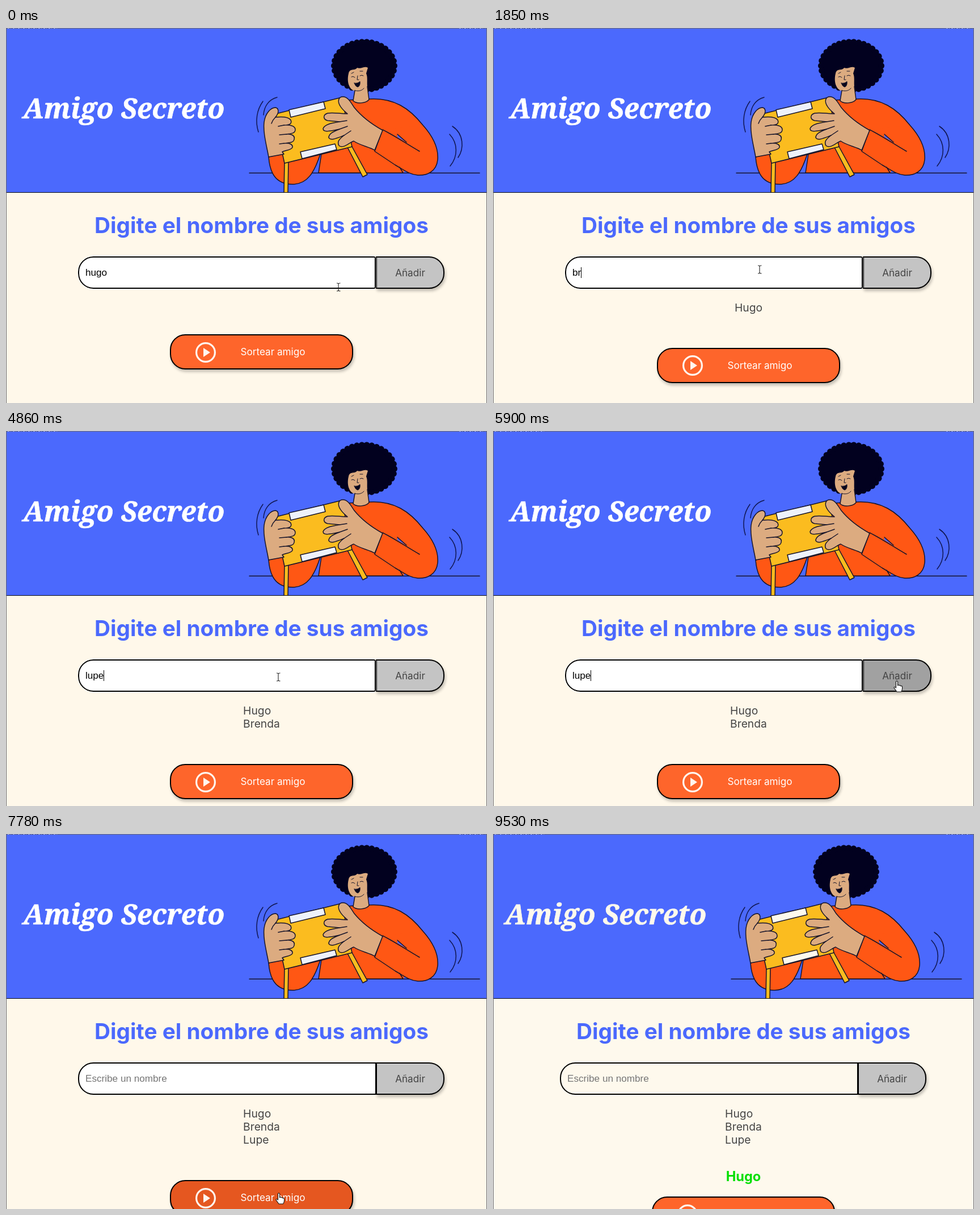
Animation of 848 by 660 pixels, one loop 9.99 s. Source, as an HTML page:

```html
<!DOCTYPE html>
<html lang="es">
<head>
<meta charset="utf-8">
<title>Amigo Secreto</title>
<style>
  :root { --paper: #fff8ea; --white: #fff; --strip: #eef2fb; }
  html, body { margin: 0; width: 100%; height: 100%; overflow: hidden; }
  body { position: relative; background: var(--paper); font-family: Inter, "Liberation Sans", sans-serif; }
  body.drawn { --paper: #fef9ed; --white: #fef9ed; --strip: #fef9ed; }
  #page, #page > *, .bar, .frame, #cursor, #cursor svg, .draw > * { position: absolute; box-sizing: border-box; }
  #page { left: 0; top: 0; width: 901px; height: 660px; }
  .drawn #page { left: -9px; }
  .bar { left: 0; top: 0; width: 848px; height: 290px; background: #4b69fd; border-bottom: 1px solid #0b0b14; }
  .frame { left: 0; top: 0; width: 848px; height: 660px; border: solid #6b6b72; border-width: 1px 1px 0; }
  .frame::before, .frame::after { content: ""; position: absolute; top: -1px; height: 1px;
    background: repeating-linear-gradient(90deg, #b4b4bc 0 3px, #5c5c66 3px 5px, #a2a2ae 5px 6px, #5c5c66 6px 9px); }
  .frame::before { left: 2px; width: 87px; }
  .frame::after { right: 4px; width: 44px; }
  #page svg { left: 0; top: 0; }
  h1, h2 { margin: 0; white-space: nowrap; }
  h1 { left: 30px; top: 110px; font: italic 900 48.8px/61px "Noto Serif", "Liberation Serif", serif;
    color: var(--white); -webkit-text-stroke: .7px var(--white); }
  h2 { left: 0; top: 322px; width: 100%; text-align: center; font-size: 38.75px; line-height: 50px; font-weight: 700; color: #4b69fd; }
  .field { left: 127px; top: 402px; width: 526px; height: 57px; padding-left: 11px; border: 2px solid #000;
    border-radius: 27px 0 0 27px; background: var(--white); color: #757575; white-space: nowrap;
    font: 17.15px/53px "Liberation Sans", Arial, sans-serif; }
  .focus .field { width: 525px; color: #000; border-radius: 27px 3px 3px 27px; outline: 1px solid rgba(255, 255, 255, .6); z-index: 1; }
  #caret { display: none; width: 1px; height: 19px; margin-right: -1px; vertical-align: -4px; background: #000; }
  .caret #caret { display: inline-block; }
  .add, .draw { border: 2px solid #000; box-shadow: 2px 4px 5px rgba(0, 0, 0, .24); font-size: 17.15px; text-align: center; }
  .add { left: 652px; top: 402px; width: 121px; height: 57px; line-height: 53px; border-radius: 0 27px 27px 0; background: #c4c4c4; color: #444; }
  .add.hover { background: #a1a1a1; }
  #list { left: 0; top: 480.5px; width: 100%; text-align: center; font-size: 19.3px; line-height: 23.35px; color: #444; }
  #list span { display: inline-block; text-align: left; white-space: pre; }
  #winner { left: 0; top: 588px; width: 100%; text-align: center; font-size: 23.6px; line-height: 30px; font-weight: 700; color: #05df05; }
  .draw { left: 288.5px; width: 323px; height: 62px; border-radius: 27px; background: #fe652b; color: var(--white); }
  .draw.hover { background: #e55720; }
  .draw span { left: 80px; top: 0; width: 200px; line-height: 58px; }
  #page .draw svg { left: 41.5px; top: 9.5px; }
  #cursor { left: 0; top: 0; z-index: 2; }
  #cursor svg { left: 0; top: 0; overflow: visible; display: none; }
  #cursor.beam .beam, #cursor.hand .hand, #cursor.arrow .arrow { display: block; }
</style>
</head>
<body>
<div class="bar"></div>
<div id="page">
  <svg width="901" height="289" fill="none" stroke="#16142a" stroke-width="1.5" stroke-linejoin="round" stroke-linecap="round">
    <path d="M429 255.300H835"/>
    <g stroke="#10164f">
      <path d="M453 129C442 144 439 164 445 183M478 122C463 126 455 138 454 153"/>
      <path d="M787 173C807 186 808 212 797 228M782 187C797 203 797 226 783 243"/>
    </g>
    <!-- hair -->
    <ellipse cx="631.5" cy="66.5" rx="53" ry="42" fill="#02011f" stroke="#02011f" stroke-width="11" stroke-dasharray="0 8.8"/>
    <!-- torso and near arm -->
    <g fill="#ff5714">
      <path stroke="none" d="M600 127L640 125C684 122 712 142 735 171L729 217L700 255H551L560 200Z"/>
      <path stroke="none" d="M735 171C752 190 763 211 761 232C759 252 743 260 726 259C711 258 700 249 686 241L650 217L664 179Z"/>
    </g>
    <path fill="#4b69fd" stroke="none" d="M690 187L690 192L706 201Z"/>
    <path d="M556 222L551 255H700L694 245M600 127L640 125C684 122 712 142 735 171C752 190 763 211 761 232C759 252 743 260 726 259C711 258 700 249 686 241L650 217L664 179C686 190 708 205 729 217M690 187L706 201"/>
    <!-- face and neck -->
    <g fill="#dcab80">
      <path stroke="none" d="M604 80C606 70 615 76 619 70C626 73 632 66 638 70L635 80C638 86 636 95 637 103L640 126L612 127L615 111C603 107 601 92 604 80Z"/>
      <path d="M615 110L612 128C618 134 634 133 640 126L637 103"/>
    </g>
    <path d="M615 110C622 112 628 110 631 106" stroke-width="1"/>
    <path d="M609 86Q612 84 615 87M624 84Q627 82 630 84M609 80L613 78M624 76L629 76M620 84L619 91L622 91" stroke-width="1"/>
    <path fill="#08061c" d="M614 97Q620 98 624 94Q625 102 620 104Q616 103 614 97Z" stroke-width="1"/>
    <!-- far sleeve -->
    <path fill="#ff5714" d="M463 227C465 253 474 275 505 275C532 275 544 253 554 222L490 220Z"/>
    <!-- table -->
    <g fill="#fbbc1f">
      <path d="M491 236L498 234L497 290H490Z"/>
      <path d="M602 210L609 207L637 258L629 262Z"/>
      <path d="M472 152L592 122L610 209L491 238Z"/>
    </g>
    <g style="fill: var(--strip)">
      <path d="M499 144L560 130L563 142L502 157Z"/>
      <path d="M519 218L580 204L583 214L522 230Z"/>
    </g>
    <!-- hands -->
    <g fill="#dcab80">
      <path d="M463 227C459 205 453 184 455 166C457 150 467 140 475 140C481 141 482 149 475 157C485 156 498 156 502 162C505 169 499 171 490 171C500 170 510 172 510 179C510 185 504 186 494 187C503 186 510 189 508 196C507 202 499 202 490 203C500 202 506 205 505 210C503 215 493 215 487 218L490 222Z"/>
      <path d="M664 180C646 170 627 156 614 140C608 131 603 121 594 121C586 121 584 129 589 137C593 144 599 148 602 151C589 151 577 148 567 150C558 153 559 161 567 163L588 165C576 167 562 169 559 177C559 184 570 182 588 178C579 182 569 185 569 193C572 199 583 194 596 189C588 195 583 200 587 207C594 213 603 203 613 199C625 207 640 209 650 215Z"/>
    </g>
    <path d="M475 157Q470 162 468 168M490 171L480 173M494 187L482 188M490 203L482 204M588 165L601 163M588 178L602 173M596 189L608 181"/>
  </svg>
  <h1>Amigo Secreto</h1>
  <h2>Digite el nombre de sus amigos</h2>
  <div class="field"><span id="text"></span><i id="caret"></i></div>
  <div class="add">Añadir</div>
  <div id="list"><span></span></div>
  <div id="winner"></div>
  <div class="draw">
    <svg width="40" height="40"><circle cx="20" cy="20" r="16.4" fill="none" stroke="#fff5ee" stroke-width="3.2"/><path d="M16 12L28 20L16 28Z" fill="#fff5ee"/></svg>
    <span>Sortear amigo</span>
  </div>
</div>
<div id="cursor">
  <svg class="beam" width="1" height="1" fill="none" stroke="#222" stroke-width="1.1"><path d="M-3 -7Q0 -7 0 -5.5Q0 -7 3.5 -7M0 -6V6M-3 7Q0 7 0 5.5Q0 7 3.5 7"/></svg>
  <svg class="hand" width="1" height="1" fill="#fff" stroke="#111" stroke-width="1.1" stroke-linejoin="round"><path d="M-1.5 1Q0 -1 1.5 1V8Q3 6 4.500 8Q6 7 7 9Q9 8 9.500 10V14Q9 17 7.500 19H0L-5 12Q-5 9 -1.500 12Z"/></svg>
  <svg class="arrow" width="1" height="1" fill="#fff" stroke="#111" stroke-width="1"><path d="M0 0V15L3.500 12L6 17.500L8.500 16.500L6 11H11Z"/></svg>
</div>
<div class="frame"></div>
<script>
  const LOOP = 9990, DRAW = 8080;
  const friends = [[690, 'Hugo'], [3020, 'Brenda'], [6200, 'Lupe']];
  const typing = [
    [0, 'hugo'], [690, ''],
    [1570, 'b'], [1850, 'br'], [1980, 'bre'], [2130, 'brend'], [2280, 'brenda'], [3020, ''],
    [4310, 'l'], [4450, 'lu'], [4590, 'lup'], [4860, 'lupe'], [6200, '']
  ];
  // first step, last step, number of steps, resting point
  const moves = [
    [0, 0, 1, 586, 456], [140, 390, 3, 700, 440], [840, 1140, 3, 470, 425],
    [2740, 2880, 2, 690, 445], [3180, 3330, 2, 485, 452], [3450, 3750, 3, 480, 433],
    [5450, 5900, 4, 712, 440], [6490, 6630, 2, 702, 452], [6780, 6930, 2, 606, 506],
    [7220, 7780, 5, 481, 632], [DRAW, DRAW, 1, 481, 628], [8960, 9530, 5, 811, 664]
  ];
  const $ = s => document.querySelector(s);
  const field = $('#text'), list = $('#list span'), winner = $('#winner');
  const add = $('.add'), draw = $('.draw'), cursor = $('#cursor');

  function pointer(t) {
    let x = 0, y = 0;
    for (const [start, end, steps, toX, toY] of moves) {
      if (t < start) break;
      const gap = (end - start) / (steps - 1 || 1) || 1;
      const p = Math.min(1, (Math.floor((t - start) / gap + 1e-6) + 1) / steps);
      x += (toX - x) * p;
      y += (toY - y) * p;
    }
    return [x, y];
  }

  function render(t) {
    const text = typing.filter(([at]) => t >= at).pop()[1];
    const names = friends.filter(([at]) => t >= at).map(([, name]) => name);
    const drawn = t >= DRAW;
    const [x, y] = pointer(t);
    const top = drawn ? 638 : 539.4 + 23.35 * names.length;
    const inRow = y > 402 && y < 459;
    const overAdd = inRow && x >= 653 && x < 773;
    const overDraw = !drawn && y > top && x > 290 && x < 612;
    const inField = inRow && x > 127 && x < 653;

    field.textContent = text || 'Escribe un nombre';
    list.textContent = names.join('\n');
    winner.textContent = drawn ? friends[0][1] : '';
    draw.style.top = top + 'px';
    add.classList.toggle('hover', overAdd);
    draw.classList.toggle('hover', overDraw);
    document.body.classList.toggle('drawn', drawn);
    document.body.classList.toggle('focus', text !== '');
    document.body.classList.toggle('caret', text !== '' && t >= 140);
    cursor.className = inField ? 'beam' : overAdd || overDraw ? 'hand' : 'arrow';
    cursor.style.transform = `translate(${Math.round(x)}px, ${Math.round(y)}px)`;
  }

  function tick() {
    render(performance.now() % LOOP);
    requestAnimationFrame(tick);
  }
  tick();
</script>
</body>
</html>
```
